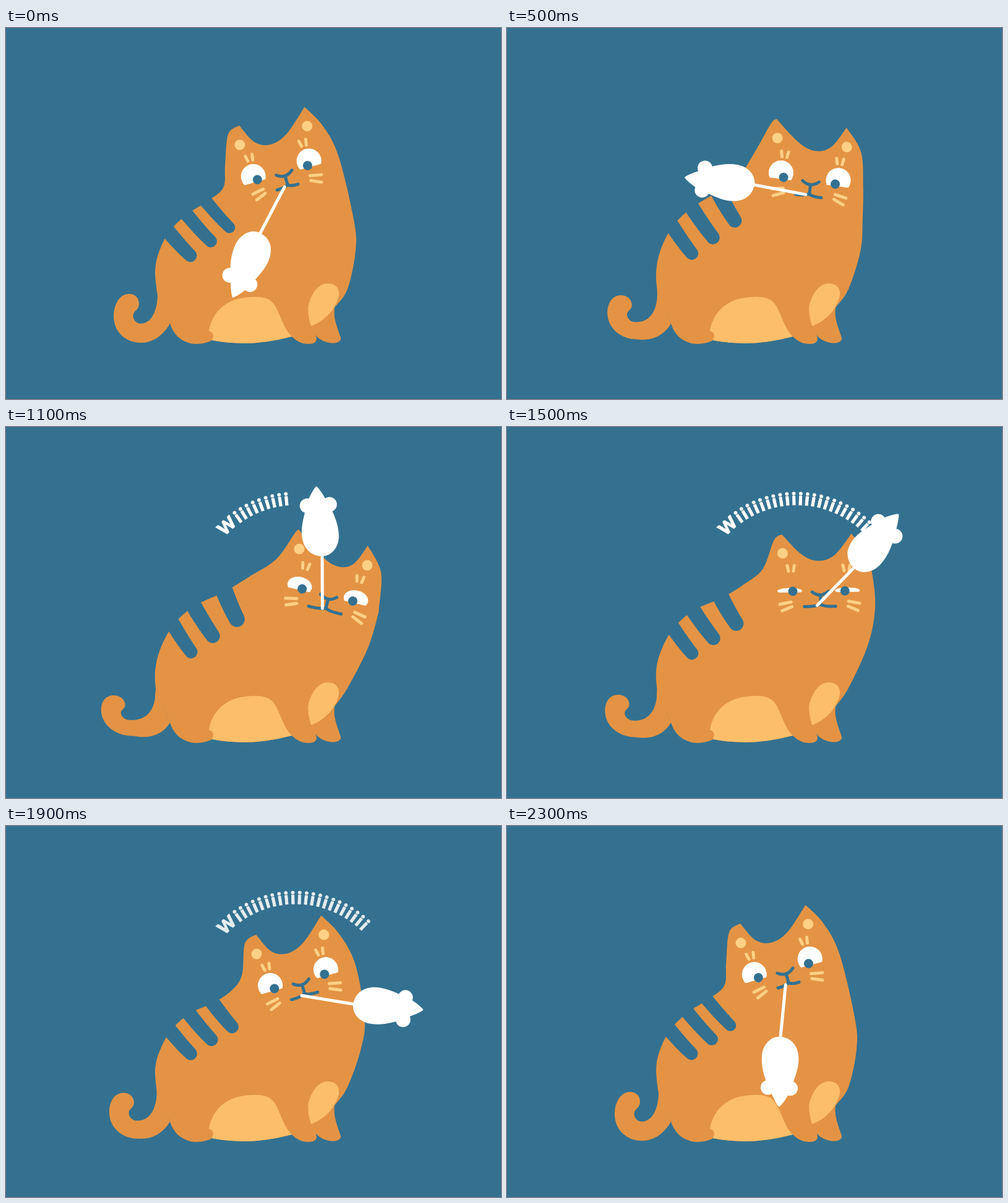
An HTML page for the animation above (2.4 s loop, 800 by 600 pixels).

```html
<!DOCTYPE html>
<html lang="en">
<head>
<meta charset="utf-8">
<title>Cat swinging a toy mouse</title>
<style>
  html, body { margin: 0; width: 100%; height: 100%; overflow: hidden; background: #347190; }
  svg { display: block; width: 100vw; height: 100vh; }
  .fur { fill: #e49344; }
  .belly { fill: #fdbe69; }
  .pale { fill: #ffd085; }
  .white { fill: #fff; }
  .gap { fill: #347190; }
  .line { fill: none; stroke: #347190; stroke-width: 5; stroke-linecap: round; stroke-linejoin: round; }
  .hair { fill: none; stroke: #ffd085; stroke-width: 5; stroke-linecap: round; }
  text { font: 900 28px Lato, "Open Sans", sans-serif; fill: #fff; stroke: #fff; stroke-width: 0.8; text-anchor: middle; }
</style>
</head>
<body>
<svg viewBox="0 0 800 600">
  <rect class="gap" width="800" height="600"/>
  <path id="tail" class="fur"/>
  <path id="body" class="fur"/>
  <path id="stripes" class="gap"/>
  <path class="belly" d="M328 490C331 468 347 443 380 437C405 433 421 434 431 444C442 456 447 485 462 499Q420 510 385 510Q355 509.500 333 505Z"/>
  <circle class="fur" cx="327" cy="498" r="8"/>
  <path class="belly" d="M493 482C489 470 487 455 489 447C495 425 507 413 520 413C534 413 539 423 538 431C537 443 525 470 493 482Z"/>
  <g id="face">
    <g id="dots" class="pale">
      <circle cx="-56.500" cy="-55" r="8.500"/>
      <circle cx="56.500" cy="-55" r="8.500"/>
    </g>
    <path class="hair" d="M-50.500 -35L-48.500 -26M-39 -35L-40.500 -26M39.500 -35L41.500 -26M51 -35L49.500 -26"/>
    <path id="cheekL" class="hair" d="M-55 27.500L-37 24M-51.500 38L-35.500 31.500"/>
    <path id="cheekR" class="hair" d="M42 23.500L60 27M41 31.500L57 38.500"/>
    <path id="eyeL" class="white"/>
    <path id="eyeR" class="white"/>
    <circle class="gap" cx="-41.700" cy="6.700" r="7.500"/>
    <circle class="gap" cx="42.500" cy="6.700" r="7.500"/>
    <path class="line" d="M-10.500 8Q3 18.500 16 7M3 13L3 28"/>
    <path id="mouth" class="line"/>
  </g>
  <g id="cheer"></g>
  <g id="mouse">
    <path d="M0 0V-88" stroke="#fff" stroke-width="5" stroke-linecap="round"/>
    <path class="white" d="M-9 -197.500C-7 -197.500 2 -184 5 -178C17 -159 27 -138 27 -117C27 -99 15 -84.500 0 -84.500C-21 -84.500 -33 -101 -33 -123C-33 -138 -28 -155 -22 -175C-20 -182 -11 -197.500 -9 -197.500Z"/>
    <circle class="white" cx="-24" cy="-166" r="12"/>
    <circle class="white" cx="12" cy="-168" r="12"/>
  </g>
</svg>
<script>
const LOOP = 2400, STEP = 100;

// Key points of the motion; everything else follows from these four channels.
const TIMES = [0, 300, 700, 1100, 1500, 1900, 2300];
const LEAN = [0, 0.35, 0.79, 1, 0.775, 0.36, 0];        // sideways, 0 to 1
const DROP = [0, 4.7, 21.8, 37.6, 31.2, 17.5, 0];       // head lowered, px
const TILT = [-15.6, -0.3, 12.8, 13.5, -0.5, -16, -15.6]; // head angle
const SWING = [117.7, 161, 219.4, 269.8, 314.3, 369.3, 455.6]; // toy angle

const TAIL = "M245 425C246 455 236 478 218 478C208 478 204 468 206 462C208 457 215 455 215 446C215 436 208 430 199 430C183 430 174 448 174 466C174 492 194 509 218 509C240 509 256 494 265 478Z";
const LEGS = "C529 468 533 478 541 501C542 508 532 511 522 509C512 507 504 502 500 496C504 504 502 511 489 511C476 511 468 505 462 499Q420 510 385 510Q355 509.5 333 505C322 511 308 512 298 510C280 505 270 494 265 478Z";

const $ = id => document.getElementById(id);
const clamp = (v, lo, hi) => Math.min(hi, Math.max(lo, v));
const ease = (from, to, t) => {
  const u = clamp((t - from) / (to - from), 0, 1);
  return u * u * (3 - 2 * u);
};

// Smooth looping interpolation through a channel
function sample(channel, t, turn = 0) {
  const count = TIMES.length;
  const key = k => {
    const lap = Math.floor(k / count), m = k - lap * count;
    return { t: TIMES[m] + lap * LOOP, v: channel[m] + lap * turn };
  };
  const i = TIMES.filter(time => time <= t).length - 1;
  const [a, b, c, d] = [i - 1, i, i + 1, i + 2].map(key);
  const span = c.t - b.t, u = (t - b.t) / span, rise = c.v - b.v;
  const v0 = (c.v - a.v) / (c.t - a.t) * span;
  const v1 = (d.v - b.v) / (d.t - b.t) * span;
  return b.v + u * (v0 + u * (3 * rise - 2 * v0 - v1 + u * (v0 + v1 - 2 * rise)));
}

// Bezier segments through a run of points
function curve(points) {
  const at = i => points[clamp(i, 0, points.length - 1)];
  const handle = (p, from, to, side) => [0, 1].map(n => p[n] + side * (to[n] - from[n]) / 6);
  return points.slice(1).map((p, i) =>
    `C${handle(at(i), at(i - 1), p, 1)} ${handle(p, at(i), at(i + 2), -1)} ${p}`).join("");
}

// Tapered band from the back's edge to a rounded end
function stripe([tx, ty], [ex, ey], r) {
  const len = Math.hypot(ex - tx, ey - ty), dx = (ex - tx) / len, dy = (ey - ty) / len;
  const point = (along, across) => [tx + dx * along + dy * across, ty + dy * along - dx * across];
  return `M${point(-14, -r * 1.12)}Q${point(len / 2, -r - 3)} ${point(len, -r)}` +
    `A${r} ${r} 0 0 0 ${point(len, r)}Q${point(len / 2, r - 1)} ${point(-14, r * 1.15)}Z`;
}

function eye(x, open) {
  const y = v => 8 + (v - 8) * open;
  return `M${x - 17.4} ${y(9.8)}A20 ${20 * open} 0 1 1 ${x + 17.4} ${y(9.8)}Z`;
}

const cheer = [..."W" + "i".repeat(22)].map((letter, k) => {
  const el = document.createElementNS("http://www.w3.org/2000/svg", "text");
  const angle = k ? -38.8 + 3.73 * k : -43;
  el.textContent = letter;
  el.setAttribute("transform", `translate(468 279) rotate(${angle}) translate(0 -153)`);
  $("cheer").append(el);
  return el;
});

function draw(t) {
  const set = (id, name, value) => $(id).setAttribute(name, value);
  const lean = sample(LEAN, t), drop = sample(DROP, t), tilt = sample(TILT, t);
  const fx = 444.7 + 76 * lean, fy = 227.5 + drop;
  const cos = Math.cos(tilt * Math.PI / 180), sin = Math.sin(tilt * Math.PI / 180);

  // Point on the head; slide shifts it sideways as the head turns
  const head = (x, y, slide = 0) => {
    x += slide * tilt;
    return [fx + x * cos - y * sin, fy + x * sin + y * cos];
  };
  // Point on the back, dragged along by the head with the given weight
  const back = (x, y, w) => [x + 40 * w * w * lean, y + 0.37 * w * w * drop - w * tilt];
  // Point on the tail; its tip swings furthest
  const wag = (_, x, y) => {
    const k = clamp((250 - x) / 32, 0, 1) * lean, below = y - 430;
    return `${+x - k * (25 - 0.15 * below)} ${+y + k * (4 - 0.17 * below)}`;
  };

  const tops = [back(263.5, 323, 0.43), back(292.5, 293, 0.54), back(324, 267.5, 0.86)];
  const ends = [back(298, 365.5, 0.16), back(331, 340.5, 0.28), back(361, 314, 0.55)];
  const earL = head(-59, -85.3, -0.8), earR = head(53.5, -86, -0.62);
  const nape = [back(351, 243, 1), head(-90, -30, -0.28), head(-71.5, -76.5, -0.25)];
  const crown = [head(-27, -53, 0.2), head(0.3, -42.2, 0.42), head(27, -52, 0.2)];
  const flank = [head(79, -50, -0.25), head(90, 5, -0.3),
    [562 + drop, 310], [565 + drop / 2, 360], [552, 422]];
  const hip = [244.5 - 2 * lean, 430];

  set("tail", "d", TAIL.replace(/(\d+) (\d+)/g, wag));
  set("body", "d", `M${hip}` +
    curve([hip, [241, 395], back(246, 361, 0.3), ...tops, ...nape, earL]) +
    curve([earL, ...crown, earR]) +
    curve([earR, ...flank, [531, 452]]) + LEGS);
  set("stripes", "d", tops.map((top, i) =>
    stripe(top, ends[i], 10.5 - 0.6 * i + 1.7 * i * lean)).join(""));

  const open = 1 - 0.76 * (ease(800, 1500, t) - ease(1500, 1900, t));
  const grin = drop / 4;
  set("face", "transform", `translate(${fx} ${fy}) rotate(${tilt})`);
  set("dots", "transform", `translate(${-1.4 - 0.25 * tilt} 0)`);
  set("cheekL", "transform", `translate(${-grin} 0)`);
  set("cheekR", "transform", `translate(${grin * 0.8} 0)`);
  set("eyeL", "d", eye(-46.7, open));
  set("eyeR", "d", eye(46.7, open));
  set("mouth", "d", `M${-15.6 - grin} 31.5Q-6 32 3 28Q8 32 ${19.6 + grin} 31.5`);

  // The toy hangs from the mouth
  set("mouse", "transform", `translate(${head(-2.5, 29.7)}) rotate(${sample(SWING, t, 360) - 270})`);

  const shown = Math.floor(10 + (t - 1100) * 0.0325);
  cheer.forEach((el, k) => el.style.display = k < shown ? "" : "none");
  set("cheer", "opacity", clamp(1 - (t - 1850) / 400, 0, 1));
}

const start = performance.now();
function tick() {
  const t = (performance.now() - start) % LOOP;
  draw(Math.floor(t / STEP) * STEP);
  requestAnimationFrame(tick);
}
tick();
</script>
</body>
</html>
```
